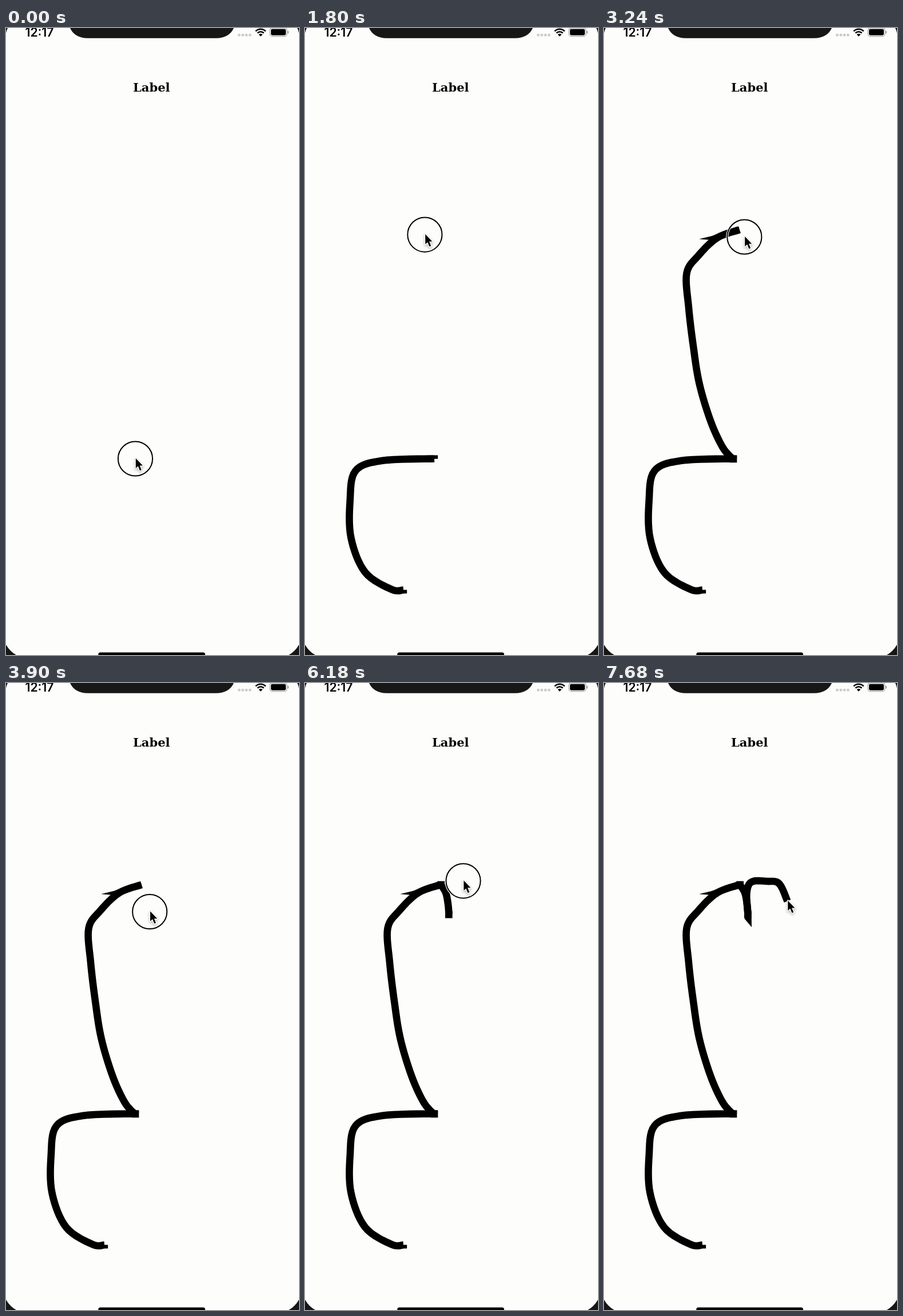
Animation of 512 by 1094 pixels, one loop 8000 ms. Source, as an HTML page with a canvas:

```html
<!DOCTYPE html>
<html lang="en">
<head>
<meta charset="utf-8">
<title>Drawing canvas</title>
<style>
html, body { margin: 0; width: 100%; height: 100%; overflow: hidden; background: #fdfdfc; }
canvas { display: block; width: 512px; height: 1094px; }
</style>
</head>
<body>
<canvas id="stage" width="512" height="1094"></canvas>
<script>
const ctx = document.getElementById("stage").getContext("2d");
const LOOP = 8000;
const INK = "#000";
const PAPER = "#fdfdfc";
const BEZEL = "#171717";
const PEN = 12.6;

// The finger goes down at `press`, travels from `from` to `to`, and the ink shows at `lift`.
const strokes = [
  {
    press: 0, from: -1000, to: 0, lift: 140,
    curve: spline([172, 980.5], [151, 979.5], [105, 949.5], [80.5, 890], [78.7, 825], [88, 773], [134, 755], [226, 751.5]),
    dabs: [[175, 983.5, PEN / 2], [229, 748.6, PEN / 2]]
  },
  {
    press: 420, from: 420, to: 2200, lift: 2600,
    curve: spline([225, 752], [207, 731], [186, 685], [166.5, 620], [156, 555], [148, 488],
      [144.5, 428], [165, 397], [198, 366], [237, 352]),
    dabs: [[226, 752, PEN]],
    spike: "M166 368.3L188 363L234 346L200 371Z"
  },
  {
    press: 3060, from: 3060, to: 4220, lift: 4280,
    curve: spline([237.5, 352], [246, 366], [250, 386], [251.5, 404]),
    dabs: [[237.7, 352, PEN], [251.3, 404, PEN]]
  },
  {
    press: 4900, from: 5500, to: 7450, lift: 7560,
    curve: spline([251.5, 404], [249.5, 366], [258, 347], [285, 346], [306, 350], [320.5, 380.5]),
    dabs: [],
    spike: "M245.3 411L257.7 403L258 426Z"
  }
];

// Catmull-Rom curve as a dense polyline with the running length as third value.
function spline(...keys) {
  const points = [];
  const steps = 8;
  let length = 0;
  for (let i = 0; i < keys.length - 1; i++) {
    const [a, b, c, d] = [-1, 0, 1, 2].map(k => keys[Math.min(Math.max(i + k, 0), keys.length - 1)]);
    for (let s = i ? 1 : 0; s <= steps; s++) {
      const u = s / steps;
      const [x, y] = [0, 1].map(n => b[n] + 0.5 * u * (c[n] - a[n]
        + u * (2 * a[n] - 5 * b[n] + 4 * c[n] - d[n] + u * (3 * (b[n] - c[n]) + d[n] - a[n]))));
      const last = points.at(-1);
      if (last) length += Math.hypot(x - last[0], y - last[1]);
      points.push([x, y, length]);
    }
  }
  return points;
}

function pointOn(curve, share) {
  const goal = share * curve.at(-1)[2];
  const i = Math.max(1, curve.findIndex(point => point[2] >= goal));
  const [p, q] = [curve[i - 1], curve[i]];
  const k = (goal - p[2]) / (q[2] - p[2]);
  return [p[0] + (q[0] - p[0]) * k, p[1] + (q[1] - p[1]) * k];
}

const easeOut = u => 1 - (1 - u) ** 1.86;

function pointerAt(t) {
  const { curve, from, to } = strokes.findLast(stroke => t >= stroke.press);
  const u = Math.min(Math.max((t - from) / (to - from), 0), 1);
  return pointOn(curve, u < 1 ? easeOut(u) : 0.9999);
}

function box(x, y, w, h, r, color) {
  ctx.fillStyle = color;
  ctx.beginPath();
  ctx.roundRect(x, y, w, h, r);
  ctx.fill();
}

function text(str, x, y, font) {
  ctx.font = font;
  ctx.textAlign = "center";
  ctx.fillStyle = INK;
  ctx.fillText(str, x, y);
}

function drawCorner(flip) {
  ctx.save();
  if (flip) {
    ctx.translate(512, 0);
    ctx.scale(-1, 1);
  }
  ctx.fillStyle = BEZEL;
  ctx.fill(new Path2D("M0 0H3Q1 4 0 9Z M0 1076Q7 1088 18 1094H0Z"));
  ctx.restore();
}

function drawWifi(x, y) {
  ctx.strokeStyle = ctx.fillStyle = INK;
  ctx.lineWidth = 2.7;
  for (const r of [7.8, 12.3]) {
    ctx.beginPath();
    ctx.arc(x, y, r, -Math.PI * 0.75, -Math.PI * 0.25);
    ctx.stroke();
  }
  ctx.beginPath();
  ctx.moveTo(x, y + 0.5);
  ctx.arc(x, y, 4.4, -Math.PI * 0.77, -Math.PI * 0.23);
  ctx.fill();
}

function drawPhone() {
  ctx.fillStyle = PAPER;
  ctx.fillRect(0, 0, 512, 1094);
  drawCorner(false);
  drawCorner(true);
  ctx.fillStyle = BEZEL;
  ctx.fill(new Path2D("M112 0C117 11 127 17.8 143 17.8H367C383 17.8 393 11 398 0Z"));

  text("12:17", 58.5, 14.8, "600 21.2px Inter, sans-serif");
  for (let i = 0; i < 4; i++) box(405.2 + i * 6.3, 10, 4.6, 4.6, 1.7, "#cbcbcb");
  drawWifi(445, 14.3);
  ctx.strokeStyle = "#a2a2a2";
  ctx.lineWidth = 1.2;
  ctx.beginPath();
  ctx.roundRect(461.2, -0.2, 29.6, 14.8, 4);
  ctx.stroke();
  box(463, 1.7, 26, 11, 2.4, INK);
  box(492, 4.8, 2, 5, 1, "#a2a2a2");

  text("Label", 254.3, 110.5, "bold 21px 'DejaVu Serif', serif");
  box(161.3, 1089.5, 186.7, 8, 3.5, INK);
}

function drawStroke({ curve, dabs, spike }) {
  ctx.strokeStyle = ctx.fillStyle = INK;
  ctx.lineWidth = PEN;
  ctx.beginPath();
  curve.forEach(([x, y]) => ctx.lineTo(x, y));
  ctx.stroke();
  dabs.forEach(([x, y, size]) => ctx.fillRect(x - size / 2, y - size / 2, size, size));
  if (spike) ctx.fill(new Path2D(spike));
}

function drawRing(x, y) {
  for (const [color, width] of [["#fff", 4.2], [INK, 2]]) {
    ctx.strokeStyle = color;
    ctx.lineWidth = width;
    ctx.beginPath();
    ctx.arc(x, y, 30.1, 0, Math.PI * 2);
    ctx.stroke();
  }
}

const arrow = new Path2D("M0 0V17.6L4 13.9L7.2 21.6L10 20.4L6.9 12.8H12.2Z");

function drawCursor(x, y) {
  ctx.save();
  ctx.translate(x + 0.8, y - 0.8);
  ctx.lineJoin = "round";
  ctx.shadowColor = "rgba(0,0,0,0.3)";
  ctx.shadowBlur = 4;
  ctx.shadowOffsetY = 2;
  ctx.strokeStyle = "#fff";
  ctx.lineWidth = 2.8;
  ctx.stroke(arrow);
  ctx.shadowColor = "transparent";
  ctx.fillStyle = INK;
  ctx.fill(arrow);
  ctx.restore();
}

function render(now) {
  const t = now % LOOP;
  const [x, y] = pointerAt(t);
  drawPhone();
  strokes.filter(stroke => t >= stroke.lift).forEach(drawStroke);
  if (strokes.some(({ press, lift }) => t >= press && t < lift)) drawRing(x, y);
  drawCursor(x, y);
}

let start;
function tick(now) {
  start ??= now;
  render(Math.max(0, now - start));
  requestAnimationFrame(tick);
}
render(0);
requestAnimationFrame(tick);
</script>
</body>
</html>
```
